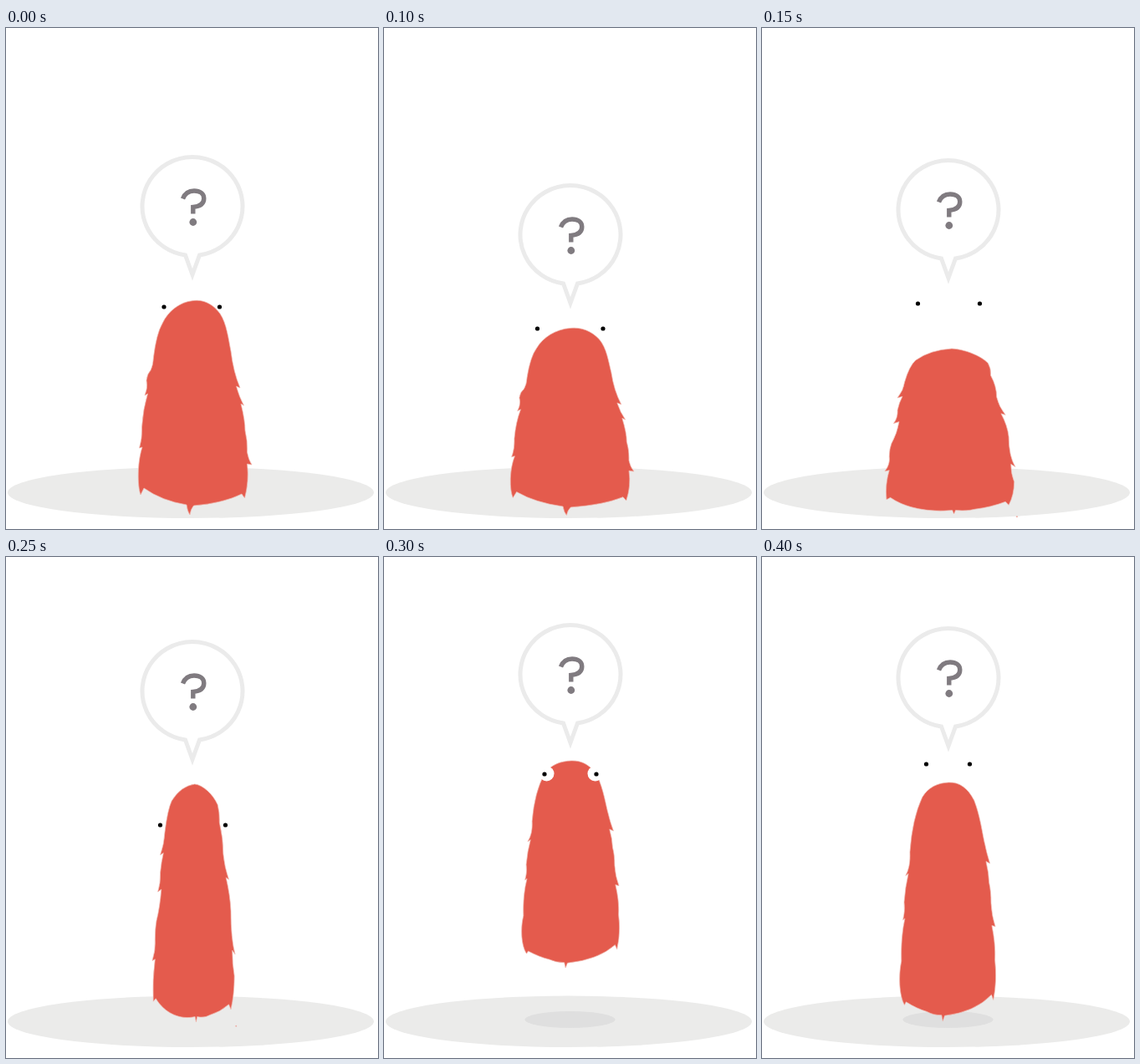
An HTML page that plays this animation: 445x600 px, repeating every 450 ms.

```html
<!DOCTYPE html>
<html lang="en">
<head>
<meta charset="utf-8">
<title>Jumping furry creature</title>
<style>
html, body { margin: 0; width: 100%; height: 100%; overflow: hidden; background: #fff; }
svg { display: block; width: 100vw; height: 100vh; }
</style>
</head>
<body>
<svg viewBox="0 0 445 600">
  <ellipse cx="221" cy="556.3" rx="219" ry="30.7" fill="#ebebea"/>
  <ellipse id="shadow" cx="222.5" cy="554" rx="54" ry="10" fill="#dfdfdf"/>
  <path id="body" fill="#e45b4d" stroke="#efb9b0" stroke-width=".7" vector-effect="non-scaling-stroke"/>
  <g id="whites" fill="#fff"><circle r="9"/><circle r="9"/></g>
  <g id="pupils" fill="#000"><circle r="2.6"/><circle r="2.6"/></g>
  <g id="bubble" fill="none" role="img" aria-label="?">
    <path d="M214.5 272A60 59 0 1 1 231.5 272L223 295.5Z" fill="#fff" stroke="#ebebeb" stroke-width="5"/>
    <path d="M211.5 204.5C214 198 219 195 225 195C232 195 236.8 198.5 236.8 204C236.8 211 231 213.8 223.8 214.4V222.5" stroke="#807b80" stroke-width="5.4"/>
    <circle cx="223.8" cy="232.5" r="4.4" fill="#807b80"/>
  </g>
</svg>
<script>
const STEP = 50;
const $ = id => document.getElementById(id);

// Fur outlines with the box (left, top, right, bottom) they are drawn in
const landing = {
  box: [158, 326, 294, 583],
  d: `M224 326.5C236 325 247 330 256 342C264 354 266 372 269 387Q272 412 280 431L275.5 429
    Q279 442 284.5 452L281 450Q286 470 286 482Q289 494 288.5 508Q290 517 294 523L288.5 522
    Q291 543 285.5 563L282 558Q260 569 224.5 572Q221 576 220 583Q217 579 216 571
    Q186 566 165 551L161 559C157 548 157 520 163 502L159.5 503Q163 492 162.5 478
    Q164 456 169.5 438L166 440Q170 431 168 422Q169 414 173 410Q176 404 176.5 394
    Q180 366 187 354C194 339 208 328 224 326.5Z`
};
const launch = {
  box: [165, 329, 284, 571],
  d: `M226 329C238 330 252 339 259 350Q262 358 261.5 368Q267 384 267 400Q269 414 275 426L271 424
    Q277 442 278 458Q278 486 284 502L280 498Q280 512 283 524Q283 543 278 558L275 553
    Q262 561 247 564Q240 567 229.5 565.5L228 571L226.5 565.5C205 569 183 562 170 547L166.5 550
    Q165 528 169 507L165 508.5Q170 498 169 487Q169 476 171 468Q176 454 178 436L173 438.5
    Q177 430 176.5 419Q178 408 181 399L176.5 401Q182 390 183 378Q187 355 193 346
    Q206 331 226 329ZM285 574.5h1v1h-1Z`
};
const airborne = {
  box: [160, 235.5, 285.5, 470],
  d: `M224 235.5C238 235 249 241 257 253C265 268 268 287 271 296Q273 304 277.5 315L272.5 313
    Q276 324 276.5 334Q279 342 279 354Q280 367 284.5 377L280 376Q285 394 284 410
    Q287 430 282 449L279.5 444Q258 461 219 464.5L216.5 470L215 464Q204 464 196 460.5
    Q184 458 169 451L167 454C160 445 159 425 163 411Q162 388 167.5 369L165 370.5
    Q168 362 166.5 353Q168 338 172 325L168.5 327Q175 318 174 304
    Q177 271 190 250C198 240 210 236 224 235.5Z`
};

// fur, body box, bubble top, pupils [left x, right x, y]
const poses = [
  [landing, [158, 326, 294, 583], 152, [189, 255.5, 334]],
  [landing, [154, 345, 297, 583], 175, [186, 259, 349]],
  [landing, [151, 359, 299, 583.5], 186, [183.5, 262, 360]],
  [launch, [147, 384, 303, 582], 156, [186.5, 260.5, 330]],
  [launch, [165, 329, 284, 571], 121, [190.5, 258.5, 294]],
  [launch, [175, 272, 274, 557], 99, [184.5, 262.5, 321]],
  [airborne, [164, 244, 282, 492], 79, [192, 254, 260]],
  [airborne, [160, 235.5, 285.5, 470], 69, [193.5, 252.5, 248]],
  [airborne, [164, 270, 280, 556], 83, [196.5, 248.5, 248]]
];

function fit([l, t, r, b], [L, T, R, B]) {
  const sx = (R - L) / (r - l), sy = (B - T) / (b - t);
  return `matrix(${sx} 0 0 ${sy} ${L - l * sx} ${T - t * sy})`;
}

function placePair(group, left, right, y) {
  [left, right].forEach((x, i) => {
    group.children[i].setAttribute('cx', x);
    group.children[i].setAttribute('cy', y);
  });
}

function draw(ms) {
  const [fur, box, top, [left, right, y]] = poses[Math.floor(ms / STEP) % poses.length];
  const flying = fur === airborne ? 'visible' : 'hidden';
  $('body').setAttribute('d', fur.d);
  $('body').setAttribute('transform', fit(fur.box, box));
  $('bubble').setAttribute('transform', `translate(0 ${top - 152})`);
  placePair($('pupils'), left, right, y);
  placePair($('whites'), left + 2.5, right - 1.5, y - .5);
  $('whites').setAttribute('visibility', flying);
  $('shadow').setAttribute('visibility', flying);
}

const start = performance.now();
function tick() {
  draw(performance.now() - start);
  requestAnimationFrame(tick);
}
tick();
</script>
</body>
</html>
```
